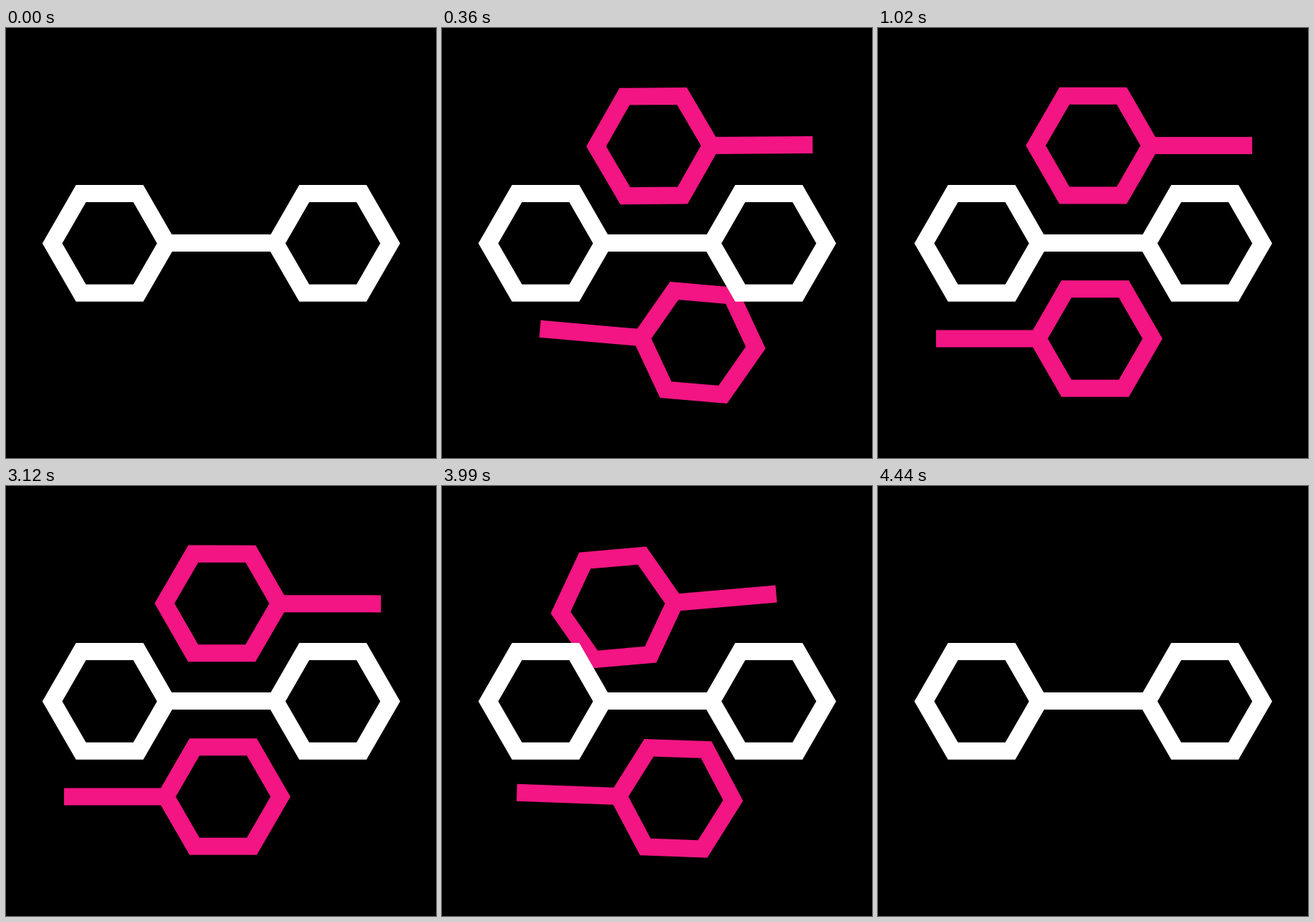
Write an HTML page that moves like this. It is 600 by 600 pixels and loops after 4.56 s.

```html
<!DOCTYPE html>
<html lang="en">
<head>
<meta charset="utf-8">
<title>Hexagon links</title>
<style>
  html, body { margin: 0; width: 100%; height: 100%; overflow: hidden; background: #000; }
  svg { display: block; width: 100%; height: 100%; }
  path { fill: none; stroke-width: 24; stroke-miterlimit: 10; }
  .pink { stroke: #f21583; }
  .white { stroke: #fff; }
</style>
</head>
<body>
<svg viewBox="0 0 600 600">
  <path id="top" class="pink"/>
  <path id="bottom" class="pink"/>
  <path id="base" class="white"/>
</svg>
<script>
const LOOP = 4560, STEP = 30;
const SHOW = 90, HIDE = 4440;   // pink pieces are visible between these times
const RADIUS = 80;
const TRAVEL = 1050, TURN = 94.5;

const byId = id => document.getElementById(id);

function hexagon(cx, cy) {
  const points = [];
  for (let i = 0; i < 6; i++) {
    const a = i * Math.PI / 3;
    points.push((cx + RADIUS * Math.cos(a)).toFixed(2) + ' ' +
                (cy + RADIUS * Math.sin(a)).toFixed(2));
  }
  return 'M' + points.join('L') + 'Z';
}

byId('base').setAttribute('d',
  hexagon(144.6, 300.4) + hexagon(456.1, 300.4) + 'M224.6 300H376.1');

// dir: side the piece comes from; flip: resting angle; enter/leave: [start, duration]
const pieces = [
  { el: byId('top'), x: 364.1, y: 164.1, dir: 1, flip: 0,
    enter: [-13, 557], leave: [3101, 1426] },
  { el: byId('bottom'), x: 239, y: 433.5, dir: -1, flip: 180,
    enter: [0, 1000], leave: [3534, 1000] }
];
for (const p of pieces) p.el.setAttribute('d', hexagon(-64, 0) + 'M16 0H158');

// Remaining distance of an elastic ease-out: 1 at the start, 0 at the end
function elastic(s) {
  if (s <= 0) return 1;
  if (s >= 1) return 0;
  return Math.pow(2, -10 * s) * Math.cos(2 * Math.PI * s);
}

function offset(p, t) {
  const [a, b] = t < LOOP / 2 ? p.enter : p.leave;
  const s = (t - a) / b;
  return p.dir * elastic(t < LOOP / 2 ? s : 1 - s);
}

function draw(time) {
  const t = Math.floor((time % LOOP) / STEP + 1e-6) * STEP;
  const visible = t >= SHOW && t < HIDE;
  for (const p of pieces) {
    const k = offset(p, t);
    p.el.setAttribute('visibility', visible ? 'visible' : 'hidden');
    p.el.setAttribute('transform',
      `translate(${p.x + TRAVEL * k} ${p.y}) rotate(${p.flip + TURN * k})`);
  }
}

const start = performance.now();
function tick() {
  draw(performance.now() - start);
  requestAnimationFrame(tick);
}
tick();
</script>
</body>
</html>
```
